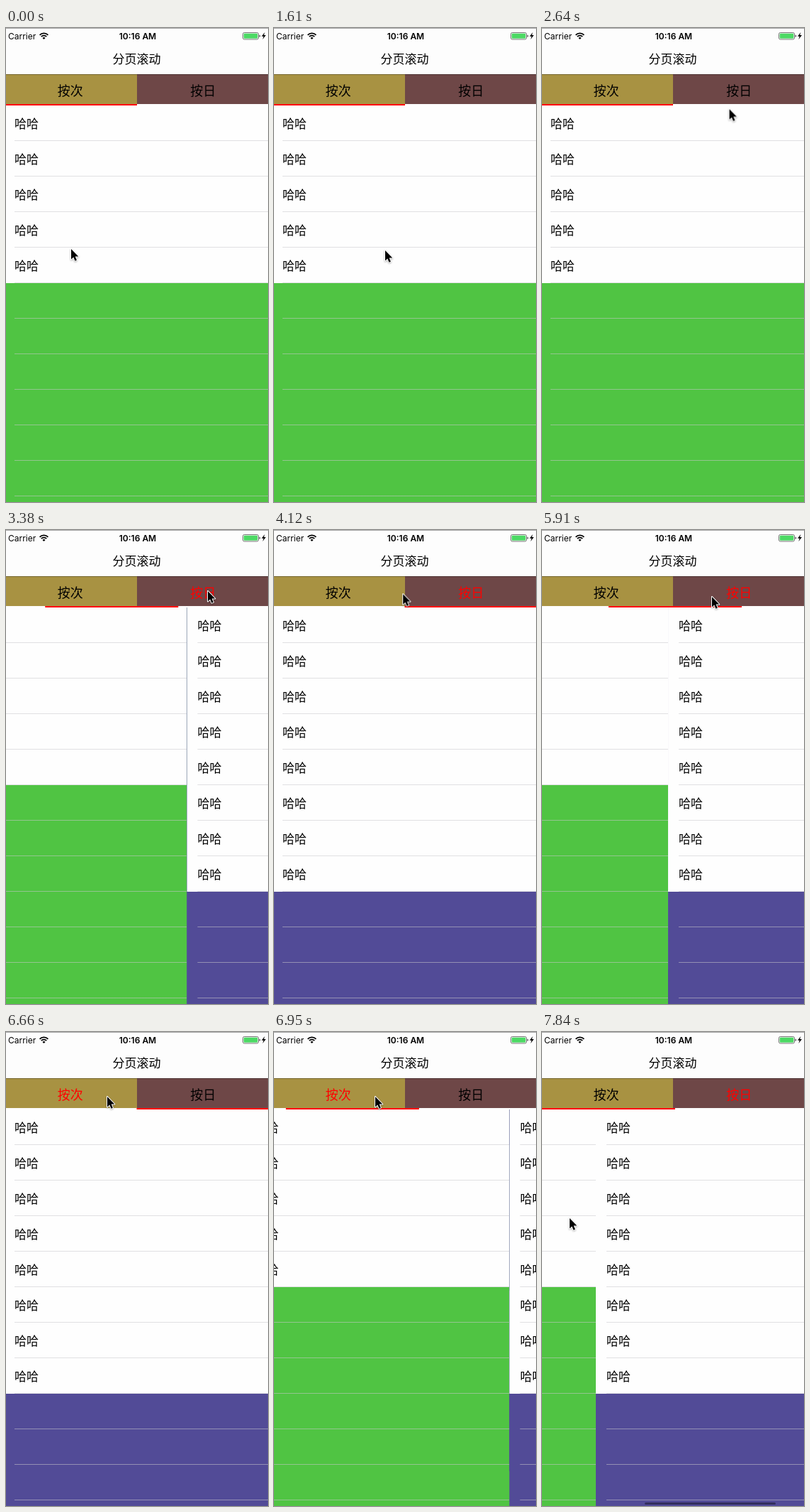
These frames come from a looping animation (370x667 px, 7.99 s). An HTML page:

```html
<!DOCTYPE html>
<html lang="zh">
<head>
<meta charset="utf-8">
<title>分页滚动</title>
<style>
  html, body { margin: 0; width: 100%; height: 100%; overflow: hidden; background: #fdfdfd; }
  .stage { position: relative; width: 370px; height: 667px; overflow: hidden; color: #000;
    font-family: "Noto Sans CJK SC", "Noto Sans CJK", "Noto Sans", sans-serif; }
  .stage div { position: absolute; }
  .screen { left: -3px; top: 0; width: 375px; height: 667px; }
  .edge { left: 0; top: 0; width: 100%; height: 1px; background: #a6a6a6; }
  .status { position: absolute; left: 0; top: 0; font: 12px Inter, "Liberation Sans", sans-serif; }
  .title { left: 0; top: 21px; width: 100%; font-size: 17px; font-weight: 500;
    line-height: 44px; text-align: center; }
  .tab { top: 65px; width: 187.5px; height: 42px; box-sizing: border-box;
    border-top: 1px solid rgba(0, 0, 0, .3); font-size: 18px; line-height: 42px; text-align: center; }
  #tab0 { left: 0; background: #a89242; }
  #tab1 { left: 187.5px; background: #6e4747; }
  #bar { left: 0; top: 107px; width: 187.5px; height: 2px; background: #f00; }
  #pages { left: 0; top: 109px; width: 750px; height: 558px; }
  .page { top: 0; width: 375px; height: 558px; overflow: hidden; }
  .cells { left: 0; top: 0; width: 100%; background: #fefefe; }
  .cells span { display: block; height: 50px; padding-left: 15px; font-size: 17px; line-height: 50px; }
  .lines { left: 15px; right: 0; top: 0; bottom: 0;
    background: repeating-linear-gradient(transparent 0 49px, rgba(200, 199, 204, .55) 49px 50px); }
  #thumb { left: 0; top: 662px; width: 185px; height: 2.5px; border-radius: 2px; background: rgba(0, 0, 0, .38); }
  #cursor { position: absolute; left: 0; top: 0; overflow: visible;
    filter: drop-shadow(0 1px 1px rgba(0, 0, 0, .3)); }
</style>
</head>
<body>
<div class="stage">
  <div class="screen">
    <div id="pages"></div>
    <div class="title">分页滚动</div>
    <div class="tab" id="tab0">按次</div>
    <div class="tab" id="tab1">按日</div>
    <div id="bar"></div>
    <div id="thumb"></div>
  </div>
  <svg class="status" width="370" height="22">
    <text x="3" y="15.5">Carrier</text>
    <g fill="none" stroke="#000" stroke-width="1.8">
      <path d="M47.6 9.9a8.3 8.3 0 0 1 11.8 0"/>
      <path d="M49.8 12.2a5.2 5.2 0 0 1 7.4 0"/>
    </g>
    <path d="M53.5 16l-2-2.1a2.9 2.9 0 0 1 4 0z"/>
    <text x="186" y="15.5" text-anchor="middle" font-weight="600">10:16 AM</text>
    <rect x="334.5" y="6.5" width="22" height="9.5" rx="2" fill="none" stroke="#555" stroke-width=".8"/>
    <rect x="335.7" y="7.7" width="19.6" height="7.1" rx="1" fill="#4cd964"/>
    <path d="M357.6 9.6q1.5 .3 1.5 1.7t-1.5 1.7z" fill="#555"/>
    <path d="M365.4 6l-4.4 5.8h2.7l-1.3 4.2 4.6-5.9h-2.8z"/>
  </svg>
  <div class="edge"></div>
  <svg id="cursor" width="14" height="20">
    <path d="M0 0V14.6L3.3 11.5L5.5 16.7L7.9 15.7L5.7 10.6H10.3Z"
      fill="#000" stroke="#fff" stroke-width="2" stroke-linejoin="round" paint-order="stroke"/>
  </svg>
</div>
<script>
const LOOP = 7990, STEP = 148, LAST = 53, PAGE = 375;
const tracks = [];

// points: [ms, value, easing to the next point]
function track(id, prop, points) {
  const keys = [...points, [LOOP, points.at(-1)[1]]];
  const anim = document.getElementById(id).animate(
    keys.map(([ms, value, easing = 'linear']) => ({ offset: ms / LOOP, [prop]: value, easing })),
    { duration: LOOP, fill: 'both' });
  anim.pause();
  tracks.push(anim);
}

function addPage(index, count, color) {
  const page = document.createElement('div');
  page.className = 'page';
  page.style.cssText = `left:${index * PAGE}px; background:${color}`;
  page.innerHTML = `<div class="cells">${'<span>哈哈</span>'.repeat(count)}</div><div class="lines"></div>`;
  document.getElementById('pages').append(page);
}
addPage(0, 5, '#50c443');
addPage(1, 8, '#524b97');

// Each tap slides to the other page in 300 ms.
const slideX = x => `translateX(${x}px)`;
const slides = width => [[0, slideX(0)], ...[3288, 4718, 5767, 6724].flatMap((ms, i) => {
  const from = i % 2 * width;
  return [[ms, slideX(from), 'ease-in-out'], [ms + 300, slideX(width - from)]];
})];
const drag = [[7590, 0], [7696, 90], [7844, 296]];
const dragBy = scale => drag.map(([ms, x]) => [ms, slideX(x * scale)]);

track('pages', 'transform', [...slides(-PAGE), ...dragBy(-1)]);
track('bar', 'transform', [...slides(PAGE / 2), [7800, slideX(0)], [7844, slideX(3)]]);
track('thumb', 'transform', [[0, slideX(0)], ...dragBy(.5)]);
track('thumb', 'opacity', [[0, 0, 'step-end'], [7600, 1]]);

const colors = (...list) => list.map(([ms, c]) => [ms, c, 'step-end']);
track('tab0', 'color', colors([0, '#000'], [4700, '#f00'], [5750, '#000'], [6650, '#f00'], [7800, '#000']));
track('tab1', 'color', colors([0, '#000'], [3270, '#f00'], [4700, '#000'], [5750, '#f00'], [6650, '#000'], [7800, '#f00']));

track('cursor', 'transform', [
  [0, 92, 311], [296, 105, 303], [444, 105, 303], [1036, 134, 276], [1184, 134, 276],
  [1332, 75, 312], [1628, 157, 313], [2368, 251, 133], [3108, 285, 86], [3404, 285, 86],
  [3552, 285, 88], [3700, 280, 89], [4440, 117, 91], [4884, 117, 91], [5476, 240, 94],
  [5920, 240, 94], [6364, 143, 91], [6956, 143, 91], [7548, 290, 262], [7696, 200, 266],
  [7844, 39, 262]
].map(([ms, x, y]) => [ms, `translate(${x}px, ${y}px)`]));

// The picture is held between evenly spaced steps.
const start = performance.now();
function draw() {
  const time = (performance.now() - start) % LOOP;
  const step = Math.min(LAST, Math.floor((time + 25) / 147.9));
  for (const anim of tracks) anim.currentTime = step * STEP;
  requestAnimationFrame(draw);
}
draw();
</script>
</body>
</html>
```
